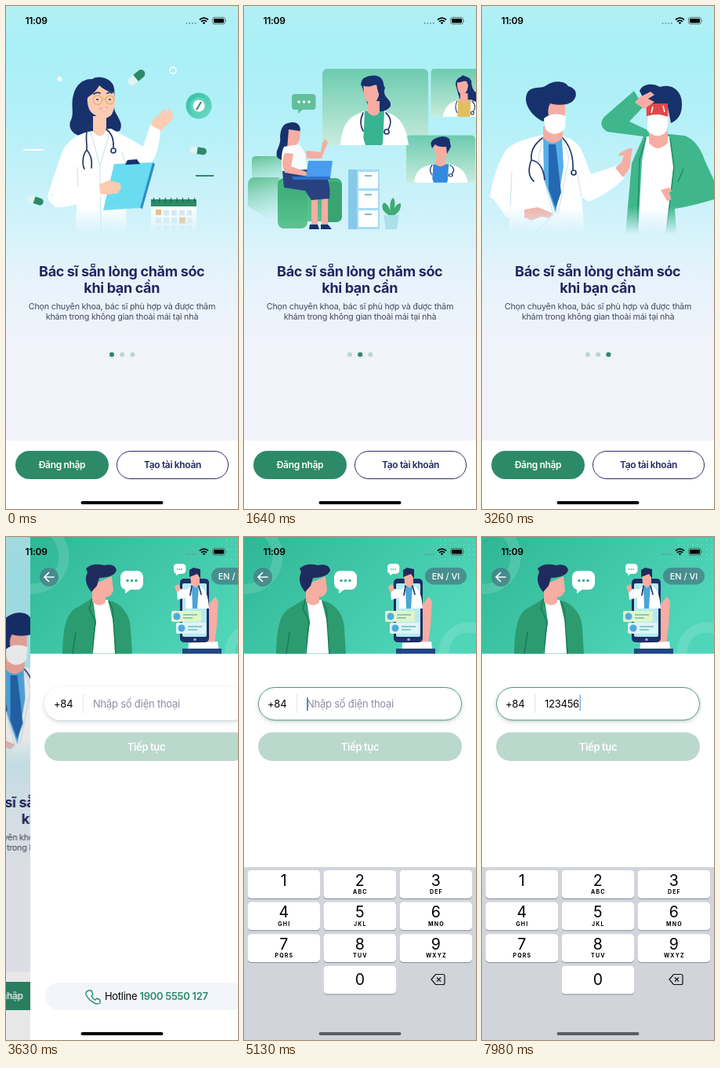
An HTML page that plays this animation: 296 by 640 pixels, repeating every 8000 ms.

```html
<!DOCTYPE html>
<html lang="vi">
<head>
<meta charset="utf-8">
<title>Đăng nhập</title>
<style>
html, body { margin: 0; width: 100%; height: 100%; overflow: hidden; background: #fff; }
svg { display: block; width: 100vw; height: 100vh; font-family: Inter, Roboto, sans-serif; }
svg svg { width: auto; height: auto; }
.mid { text-anchor: middle; }
.title { font-size: 18px; font-weight: 700; letter-spacing: -.36px; fill: #22265f; }
.sub { font-size: 10.8px; letter-spacing: -.24px; fill: #454a5e; }
.btn { font-size: 12px; font-weight: 600; letter-spacing: -.35px; }
.field { font-size: 13px; letter-spacing: -.25px; }
.n { fill: #17316d; } .s { fill: #fbcbb2; } .p { fill: #f6ada3; } .w { fill: #fff; } .g { fill: #2d8a68; } .j { fill: #3fb68b; }
.line { fill: none; stroke: #24386b; stroke-width: 1.7; stroke-linecap: round; }
.fold { fill: none; stroke: #d5e6f1; stroke-width: 1.3; }
.caret { fill: #3f7fe0; font-size: 17px; font-weight: 300; }
</style>
</head>
<body>
<svg viewBox="0 0 296 640" preserveAspectRatio="none">
<defs>
  <linearGradient id="sky" x2="0" y2="1">
    <stop offset="0" stop-color="#b2f0f5"/><stop offset=".08" stop-color="#a9eff6"/>
    <stop offset=".22" stop-color="#b3f0f8"/><stop offset=".4" stop-color="#cdf2fa"/>
    <stop offset=".54" stop-color="#e6f3fb"/><stop offset=".68" stop-color="#f1f3fa"/>
    <stop offset="1" stop-color="#f3f3fa"/>
  </linearGradient>
  <linearGradient id="card" x2="0" y2="1"><stop stop-color="#6ccbb0"/><stop offset="1" stop-color="#c9ecdc"/></linearGradient>
  <linearGradient id="sofa" x2="0" y2="1"><stop stop-color="#3fae78"/><stop offset="1" stop-color="#5cc492"/></linearGradient>
  <linearGradient id="thin" x2=".2" y2="1"><stop stop-color="#5fbf90"/><stop offset="1" stop-color="#9bdcc0" stop-opacity="0"/></linearGradient>
  <linearGradient id="head" x2="1" y2=".5"><stop stop-color="#2fb795"/><stop offset="1" stop-color="#4fd5b8"/></linearGradient>
  <linearGradient id="disc" x2="1" y2="1"><stop stop-color="#2fbfa3"/><stop offset="1" stop-color="#6edcc8"/></linearGradient>
  <linearGradient id="fall" gradientUnits="userSpaceOnUse" x1="0" x2="0" y1="255" y2="290"><stop stop-color="#fff"/><stop offset="1" stop-color="#000"/></linearGradient>
  <mask id="fade" maskUnits="userSpaceOnUse" x="0" y="0" width="296" height="300"><rect width="296" height="300" fill="url(#fall)"/></mask>
  <filter id="soft" x="-10%" y="-30%" width="120%" height="170%"><feDropShadow dx="0" dy="2" stdDeviation="2.5" flood-color="#33475c" flood-opacity=".25"/></filter>
  <clipPath id="headBox"><rect width="296" height="148.500"/></clipPath>
  <g id="copy" class="mid">
    <text class="title" x="147.700" y="343.500">Bác sĩ sẵn lòng chăm sóc</text>
    <text class="title" x="147.700" y="365">khi bạn cần</text>
    <text class="sub" x="148" y="386">Chọn chuyên khoa, bác sĩ phù hợp và được thăm</text>
    <text class="sub" x="148" y="398.500">khám trong không gian thoải mái tại nhà</text>
  </g>
  <g id="pill"><rect x="-11" y="-4.500" width="22" height="9" rx="4.500" fill="#dff3f1"/><path class="g" d="M-1-4.500h7.500a4.500 4.500 0 0 1 0 9H-1z"/></g>
  <g id="bubble"><rect width="29" height="24" rx="8"/><path d="M6 22v7l8-6z"/></g>
  <g id="doctor">
    <path class="w" d="M-43 56C-41 27 -31 19 -12 13L12 13C32 18 40 29 44 56z"/>
    <path d="M-12 13L13 13 11 56-14 56z"/>
    <path class="p" d="M-8 0H7V14Q0 23-8 14z"/>
    <path class="w" d="M-13 12L-20 28-11 56-20 56-26 20zM13 12L18 28 10 56 22 56 26 20z"/>
    <path class="line" d="M-14 15Q-20 27-14 38M15 15Q25 24 18 36"/><circle class="line" cx="16" cy="39" r="3"/>
  </g>
</defs>

<g id="home">
  <rect width="296" height="640" fill="url(#sky)"/>
  <g id="pager">
    <!-- slide 1 -->
    <g>
      <path d="M22 183h26" stroke="#fff" stroke-width="2"/><path d="M242 216h23" stroke="#2d8a68" stroke-width="2"/>
      <circle class="w" cx="68.500" cy="93" r="3"/><circle cx="213" cy="82" r="4" fill="none" stroke="#fff" stroke-width="1.500"/>
      <use href="#pill" transform="translate(166.500 91) rotate(-40) scale(1.150)"/>
      <use href="#pill" transform="translate(245 184) rotate(8)"/>
      <use href="#pill" transform="translate(37 247) rotate(18)"/>
      <circle cx="246" cy="127" r="16.500" fill="url(#disc)"/><circle cx="246" cy="127" r="11" fill="#5fd3bc"/>
      <circle class="w" cx="246" cy="127" r="7.500"/><path d="M243 132l6-10" stroke="#2d8a68" stroke-width="2"/>
      <g mask="url(#fade)">
        <path class="n" d="M110 93C118 88 132 91 137 101C141 113 136 124 139 134C144 144 150 150 145 159L130 162 99 166C88 165 79 158 82 147C88 137 82 127 86 113C89 100 99 92 110 93z"/>
        <path class="s" d="M186 157C184 147 189 140 196 138L202 130 204 135 210 129 210 135 214 138 211 146 200 156 195 163z"/>
        <path class="w" d="M104 160L134 156 158 169 175 179 184 151 197 158C196 179 189 203 177 206L152 197 154 288H88L92 231 64 255Q51 249 54 238L70 190Q77 168 104 160z"/>
        <path class="fold" d="M92 231L91 205M151 197l-3-12M108 160L120 203 121 288M133 158L120 203M57 240Q75 248 120 232"/>
        <path class="s" d="M111 140h17v17q-6 15-17 3zM104 112Q109 99 124 101L138 109Q141 127 135 138Q127 147 114 139Q102 134 104 112z"/>
        <path class="n" d="M102 124Q103 115 109 113Q116 107 119 101Q126 108 138 111L133 96 113 92 99 103z"/>
        <g fill="none" stroke="#e0b458" stroke-width="1.200"><circle cx="117" cy="119.500" r="5.800"/><circle cx="132.500" cy="119.500" r="5.300"/><path d="M123 118h4"/></g>
        <path d="M115 119h3M131 119h3" stroke="#24386b" stroke-width="1.700"/><path d="M112 112q4-3 8-1M129 111q4-2 6 0" class="line" stroke-width="1"/>
        <path class="w" d="M119 130q7 2 11-2q-3 9-11 2z" stroke="#d77b72" stroke-width=".6"/>
        <path class="line" d="M108 152C99 158 104 176 103 183C96 192 98 204 100 207M103 183Q111 192 109 206M128 157Q138 164 137 180"/><circle class="line" cx="137" cy="184" r="3"/>
        <path class="w" d="M60 239Q90 228 119 225L122 240Q88 257 62 256z"/>
        <path d="M138 201L187 199 171 257 124 260z" fill="#69dcf1"/><path d="M187 199l3 2-16 57-3-1z" fill="#2c8fc6"/>
        <path class="n" d="M152 202l3-6 12-1 4 6z"/>
        <path class="s" d="M119 227L131 222 145 225 147 231 143 238 129 240 120 239z"/>
        <rect class="w" x="185" y="247" width="58" height="43"/><path class="g" d="M185 246h58v9h-58z"/>
        <path d="M188 247h55" stroke="#175a46" stroke-width="6" stroke-dasharray="1 6.400"/>
        <path d="M191 263h46M191 273h46M191 283h46" stroke="#dce5ee" stroke-width="7" stroke-dasharray="7 3"/>
        <path d="M191 259h7v7h-7zM221 269h8v8h-8z" fill="#efb06c"/>
      </g>
      <use href="#copy"/>
    </g>
    <!-- slide 2 -->
    <g transform="translate(296)">
      <g fill="url(#card)"><rect x="100" y="80" width="135" height="97" rx="6"/><path d="M296 80H243q-4.500 0-4.500 5v51q0 5 4.500 5h53z"/><rect x="207" y="164.500" width="88" height="60.500" rx="5"/></g>
      <path class="n" d="M150 101C147 91 161 87 170 89C180 92 178 103 179 110C180 118 188 119 187 127C183 135 169 137 160 131L156 120z"/>
      <use href="#doctor" transform="translate(166 121)" fill="#38b493"/>
      <path class="p" d="M152 99L173 101Q174 117 166 124Q155 126 153 112z"/><path class="n" d="M149 101Q163 105 169 98Q170 112 176 117L180 104 170 89 152 92z"/>
      <svg x="239" y="80" width="57" height="61">
        <path class="n" d="M31 20C31 8 46 7 51 15Q51 26 57 30V43Q46 46 36 38z"/>
        <use href="#doctor" transform="translate(42 31) scale(.65)" fill="#e0c05e"/>
        <path class="p" d="M33 15l14 1q1 14-7 17q-8-2-7-18z"/><path class="n" d="M31 17q9 1 13-4l6 16-1-17-9-4z"/>
      </svg>
      <use href="#doctor" transform="translate(251 194) scale(.79 .55)" fill="#3389dd"/>
      <path class="p" d="M242 176h17q2 17-7 21q-9-2-10-21z"/><path class="n" d="M240 181Q236 172 243 169Q255 163 262 169L264 179 259 188 258 179Q248 180 244 176z"/>
      <rect x="61" y="112" width="30.500" height="20" rx="4" fill="#62bf9c"/><path d="M69 131v6l7-6z" fill="#62bf9c"/>
      <g class="w"><circle cx="70" cy="122" r="1.700"/><circle cx="76.500" cy="122" r="1.700"/><circle cx="83" cy="122" r="1.700"/></g>
      <path d="M10 196q0-5 6-5h30q6 0 6 6v36H10z" fill="url(#thin)"/><path d="M5 226q1-8 9-8h31v62L5 255z" fill="url(#thin)"/>
      <rect x="43" y="219" width="82" height="55" rx="8" fill="url(#sofa)"/><rect x="43" y="232" width="38" height="51" rx="8" fill="url(#sofa)"/><rect x="101" y="224" width="24" height="51" rx="7" fill="#3aa470"/>
      <path class="n" d="M56 149C68 145 74 153 71 161L59 186Q52 202 43 193C38 185 48 178 46 166Q47 151 56 149z"/>
      <path class="p" d="M57 157l14 2q2 13-5 18l1 8-12-3zM79 184L98 186 100 174 104 169 107 174 103 183 99 194 80 194zM86 239h8v39h-8zM99 237h8v41h-8z"/>
      <path d="M51 179L70 176Q80 184 80 207L49 212Q46 189 51 179z" fill="#f5fbff"/>
      <path d="M49 210L82 208 106 219Q111 230 109 245L86 247 78 235 51 231z" fill="#27427f"/>
      <path class="p" d="M52 187q-6 14 0 25l30 5v-5l-22-8 3-16z"/>
      <path d="M82 197h31l-3 22H79z" fill="#4a9cf0"/><path d="M61 217h49l-1 4H63z" fill="#2c71cc"/>
      <path class="n" d="M84 278h10l2 6H83zM98 278h9l5 6H98z"/>
      <rect x="133" y="208" width="40" height="76" fill="#a5dcf3"/><path d="M133 208h11v76h-11z" fill="#86c9ea"/>
      <path class="w" d="M146 211h25v21h-25zM146 235h25v22h-25zM146 260h25v21h-25z"/><path d="M154 216h9M154 240h9M154 265h9" stroke="#75bee2" stroke-width="2"/>
      <path d="M187 267C176 263 174 253 179 250Q186 254 187 263C185 250 188 245 191 244Q195 254 189 264Q193 251 200 251Q201 263 188 268z" fill="#3eaa75"/><path d="M178 266h20l-3 18h-14z" fill="#a9e0ea"/>
      <use href="#copy"/>
    </g>
    <!-- slide 3 -->
    <g transform="translate(592)">
      <g mask="url(#fade)">
        <path class="w" d="M78 164L103 165Q124 172 129 188L139 214 172 203 182 219Q160 240 136 249L127 243 131 290H34L36 259 10 243Q15 209 30 184Q39 172 78 164z"/>
        <path d="M78 166L102 167 104 205 94 264 79 220z" fill="#55aee8"/><path d="M85 176h9l7 61-7 20-9-24z" fill="#2468b2"/>
        <path class="fold" d="M78 166L72 194 91 266 67 290M103 168L111 193 97 265M38 211L36 259M127 243L122 214"/>
        <path class="p" d="M78 153h25v14q-11 14-25 1zM75 121h31v30q-8 13-22 6z"/>
        <path class="n" d="M78 147C60 138 52 121 58 110C64 101 76 106 82 101C91 94 106 95 110 102C124 105 123 121 108 125Q95 127 87 124Q83 131 85 140z"/>
        <path class="w" d="M79 143Q91 134 107 140L106 156Q93 169 81 157z"/>
        <path class="line" d="M77 168Q61 180 63 196Q56 214 66 223M63 196Q78 199 80 221M103 168Q117 183 116 208"/><circle class="line" cx="117" cy="212" r="3"/>
        <path d="M12 242L36 254 58 257 55 271 32 270z" class="w"/><path class="p" d="M54 259L71 256 91 264 85 270 76 268 63 273 54 269z"/>
        <path class="j" d="M206 166L160 160Q147 152 156 141L194 108 206 128 188 147 218 161 259 165Q276 172 284 196L296 222V246Q270 254 246 258L248 290H183L191 200z"/>
        <path class="w" d="M210 166L239 166 244 205 235 290H199L204 197z"/>
        <path d="M209 168L201 195 198 288M240 168L245 205 235 288M250 224L257 207" fill="none" stroke="#248761" stroke-width="1.300"/>
        <path class="p" d="M213 154h24v20q-13 14-24 0zM208 122h30v27h-27z"/>
        <path class="n" d="M201 108C205 98 219 98 227 103C244 98 256 110 255 126Q255 143 241 149L237 128 209 124z"/>
        <path d="M210 124h27v16q-15 4-27 0z" fill="#e0484a"/><path d="M218 128l-2 8M231 127l2 8" stroke="#fff" stroke-width="1.500"/>
        <path class="w" d="M211 140Q226 135 238 142L236 159Q224 171 211 159z"/>
        <path class="p" d="M195 123L201 116 215 109 220 113 212 118 220 122 207 131zM170 206L178 199 181 190 174 191Q173 187 188 181Q194 180 191 186L188 207 180 218zM228 234L239 231 249 244 236 248z"/>
        <path class="j" d="M239 237L270 224 296 224V246L244 255z"/>
      </g>
      <use href="#copy"/>
    </g>
  </g>
  <g fill="#b8d6d2"><circle cx="135" cy="443.500" r="3"/><circle cx="148.200" cy="443.500" r="3"/><circle cx="161.400" cy="443.500" r="3"/></g>
  <circle id="dot" class="g" cx="135" cy="443.500" r="3"/>
  <rect class="w" y="553" width="296" height="87"/>
  <rect class="g" x="12" y="566" width="119" height="36" rx="18"/>
  <rect class="w" x="141.500" y="566.500" width="142" height="35" rx="17.500" stroke="#2a2d6b"/>
  <text class="btn mid w" x="71.300" y="588">Đăng nhập</text>
  <text class="btn mid" x="212.500" y="588" fill="#22265f">Tạo tài khoản</text>
</g>
<rect id="shade" width="296" height="640"/>

<g id="login">
  <rect class="w" width="296" height="640"/>
  <g clip-path="url(#headBox)">
    <rect width="296" height="149" fill="url(#head)"/>
    <g fill="none" stroke="#fff" stroke-opacity=".13" stroke-width="13"><circle cx="2" cy="25" r="41"/><circle cx="287" cy="147" r="32"/></g>
    <path d="M250 4h46M250 10h46M250 16h46M250 22h46M250 28h46" stroke="#fff" stroke-opacity=".22" stroke-width="1.500" stroke-dasharray="1.500 4.500"/>
    <path d="M41 149C42 116 45 96 61 89L79 78 105 82Q126 91 128 116L130 149z" fill="#2c9b70"/>
    <path class="w" d="M80 79L99 80 107 113 108 149H78L84 109z"/><path d="M79 78L75 91 83 107 79 149M100 81L105 92 109 149M54 149l4-28" fill="none" stroke="#1b7a58" stroke-width="1.500"/>
    <path class="p" d="M79 61L104 50 106 68Q102 78 96 76V83Q88 91 79 82z"/>
    <path d="M78 70Q67 57 73 45L71 40Q80 32 94 36Q108 33 110 42Q108 51 88 52L85 62z" fill="#202b5d"/>
    <use href="#bubble" class="w" x="115" y="43"/><use href="#bubble" class="w" transform="translate(183 34) scale(.53)"/>
    <g fill="#35ad91"><circle cx="124" cy="55.500" r="1.700"/><circle cx="129.500" cy="55.500" r="1.700"/><circle cx="135" cy="55.500" r="1.700"/></g>
    <path d="M187 41h7" stroke="#35ad91" stroke-width="1.500" stroke-dasharray="1.500 1.200"/>
    <path class="p" d="M222 93L236 76 240 82 238 113 235 137H203L207 127z"/><path class="w" d="M202 135l37-2 2 16h-40z"/><path d="M194 142h50v7h-50z" fill="#234583"/>
    <rect x="191" y="53" width="37" height="81" rx="5" fill="#1d2f68"/><rect x="194" y="59" width="31" height="68" rx="2" fill="#b5ebef"/><circle cx="210" cy="130.500" r="1.800" fill="#8fa7d5"/>
    <path class="w" d="M187 70L191 66 200 67 207 61 216 62Q227 67 228 91H198V77L188 80z"/><path d="M206 62h9l-2 29h-6z" fill="#48a6d9"/>
    <path class="p" d="M204 47h12v13l-5 5-6-6zM184 63l5-3 3 7-5 4z"/><path d="M203 51v-9l5-3 9 2v12l-4-6z" fill="#202b5d"/>
    <path class="line" d="M206 62l-2 12m11-12l3 11" stroke-width="1"/>
    <rect x="180" y="94" width="38" height="14" rx="2" fill="#dff5cb"/><rect x="186" y="109" width="38" height="14" rx="2" fill="#def4fb"/>
    <circle cx="187" cy="101" r="4.500" fill="#51a9df"/><circle cx="193" cy="116" r="4.500" fill="#51a9df"/>
    <path d="M195 99h18M195 103h12M201 114h18M201 118h12" stroke="#6fbfaa" stroke-width="1.700"/>
  </g>
  <circle cx="24" cy="51" r="12" fill="#477a85" fill-opacity=".75"/><path d="M30.500 51h-12m5.500-6l-6 6 6 6" fill="none" stroke="#fff" stroke-width="1.700"/>
  <rect x="231" y="39" width="53" height="21.500" rx="10.700" fill="#477a85" fill-opacity=".75"/>
  <text class="mid w" x="257.500" y="53.500" font-size="11" font-weight="500">EN / VI</text>
  <rect class="w" x="18" y="191" width="260" height="42" rx="21" filter="url(#soft)"/>
  <rect id="focus" x="18.500" y="191.500" width="259" height="41.500" rx="20.700" fill="none" stroke="#4f957e"/>
  <path d="M67.500 200v24" stroke="#e3e5e9"/>
  <text class="field" x="30" y="217">+84</text>
  <g id="entries" class="field">
    <text id="entry0" x="80" y="217" fill="#8b8fa0">Nhập số điện thoại</text>
  </g>
  <rect id="caret" x="80" y="204" width="1.600" height="17" fill="#3f7fe0"/>
  <rect x="18" y="248.500" width="260" height="36.500" rx="18.200" fill="#bbd8cd"/>
  <text class="mid w" x="148" y="271.500" font-size="13" font-weight="600" letter-spacing="-.35">Tiếp tục</text>
  <rect x="19" y="567" width="258" height="35" rx="17.500" fill="#f2f6fb"/>
  <path d="M75 577l3 0 2 5-2 2q2 4 5 5l2-2 4 2v4q-3 2-7 0q-8-4-11-11q-1-4 4-5z" fill="none" stroke="#2d8a68" stroke-width="1.400" stroke-linejoin="round"/>
  <text x="95" y="589" font-size="13" letter-spacing="-.3">Hotline <tspan class="g" font-weight="600">1900 5550 127</tspan></text>
</g>

<g id="pad">
  <rect y="420" width="296" height="220" fill="#d1d4da"/>
  <g id="keys"></g>
  <path d="M239 563l5.500-6.500H254q2 0 2 2v9q0 2-2 2h-9.500zM246 560.500l5 5m0-5l-5 5" fill="none" stroke="#111" stroke-width="1.200"/>
</g>

<text x="24.500" y="23" font-size="12" font-weight="600" letter-spacing="-.3">11:09</text>
<g fill="#6f8b92"><circle cx="230.500" cy="22" r=".9"/><circle cx="234.300" cy="22" r=".9"/><circle cx="238" cy="22" r=".9"/><circle cx="241.700" cy="22" r=".9"/></g>
<path d="M247 17.500q5.500-4.800 11 0M249 19.800q3.500-3 7 0" fill="none" stroke="#000" stroke-width="1.700"/><path d="M250.700 21.300q1.800-1.400 3.600 0l-1.800 2z"/>
<rect x="263.500" y="14.500" width="16" height="8.500" rx="2.500" fill="none" stroke="#555" stroke-width=".8"/><rect x="265" y="16" width="13" height="5.500" rx="1.300"/><path d="M280.700 17.300q1.500 1.500 0 3z" fill="#555"/>
<rect id="bar" x="95.500" y="630" width="105" height="4" rx="2"/>
</svg>
<script>
const LOOP = 8000;
const svgNS = 'http://www.w3.org/2000/svg';
const sheet = document.head.appendChild(document.createElement('style'));

// Holds each value from its time in ms until the next one.
function track(id, prop, steps) {
  const frames = [...steps, [LOOP, steps.at(-1)[1]]];
  const body = frames.map(([ms, v]) => `${ms / LOOP * 100}%{${prop}:${v}}`).join('');
  sheet.append(`@keyframes ${id}{${body}}#${id}{animation:${id} ${LOOP}ms step-end infinite}`);
}
const move = (id, axis, steps) =>
  track(id, 'transform', steps.map(([ms, v]) => [ms, `translate${axis}(${v}px)`]));
const show = (id, from, to) =>
  track(id, 'opacity', [[0, from ? 0 : 1], ...(from ? [[from, 1]] : []), ...(to ? [[to, 0]] : [])]);

function add(parent, tag, attrs, text = '') {
  const el = document.createElementNS(svgNS, tag);
  for (const name in attrs) el.setAttribute(name, attrs[name]);
  el.textContent = text;
  return parent.appendChild(el);
}

// Swiping the pages
move('pager', 'X', [[0, 0], [500, -22], [600, -142], [710, -272], [810, -294], [1640, -296],
  [1760, -320], [1860, -440], [1970, -568], [2070, -590], [3260, -592]]);
move('dot', 'X', [[0, 0], [710, 13.2], [1970, 26.4]]);

// Pushing the login screen
const push = [3420, 3520, 3630, 3730, 3840, 3940].map(ms =>
  [ms, ms < 3940 ? Math.round(296 * Math.exp(-9.8 * (ms - 3400) / 1000)) : 0]);
move('login', 'X', [[0, 296], ...push]);
move('home', 'X', [[0, 0], ...push.map(([ms, x]) => [ms, -.3 * (296 - x)])]);
track('shade', 'opacity', [[0, 0], ...push.map(([ms, x]) => [ms, .1 * (1 - x / 296)])]);

// Focus and keyboard
show('focus', 4580);
show('caret', 4580, 5630);
move('pad', 'Y', [[0, 220], [4680, 150], [4790, 62], [4900, 20], [5000, 5], [5130, 0]]);
track('bar', 'fill', [[0, '#000'], [4790, '#5d5f64']]);

// Keys: press and release times of 1 to 6
const taps = [[5400, 5630], [5780, 6020], [6170, 6500], [6750, 6910], [7090, 7280], [7520, 7980]];
const letters = ['', 'ABC', 'DEF', 'GHI', 'JKL', 'MNO', 'PQRS', 'TUV', 'WXYZ'];
const keys = document.getElementById('keys');
function addKey(digit, col, row) {
  const x = 4.5 + col * 97, y = 424 + row * 40.6, cx = x + 46.3;
  add(keys, 'rect', { x, y: y + 1, width: 92.5, height: 35.7, rx: 4.5, fill: '#898c91' });
  add(keys, 'rect', { id: 'key' + digit, x, y, width: 92.5, height: 35.7, rx: 4.5, fill: '#fff' });
  add(keys, 'text', { class: 'mid', x: cx, y: y + (digit ? 19.5 : 24.5), 'font-size': 19.5 }, digit);
  add(keys, 'text', { class: 'mid', x: cx + .6, y: y + 30, 'font-size': 7, 'font-weight': 700, 'letter-spacing': 1.2 }, letters[digit - 1] || '');
}
for (let d = 1; d < 10; d++) addKey(d, (d - 1) % 3, Math.floor((d - 1) / 3));
addKey(0, 1, 3);

show('entry0', 0, taps[0][1]);
taps.forEach(([down, up], i) => {
  const n = i + 1;
  track('key' + n, 'fill', [[0, '#fff'], [down, '#b0bcc8'], [up, '#fff']]);
  const entry = add(document.getElementById('entries'), 'text', { id: 'entry' + n, x: 80, y: 217 }, '123456'.slice(0, n));
  add(entry, 'tspan', { class: 'caret', dx: -1.5 }, '|');
  show('entry' + n, up, taps[n]?.[1]);
});
</script>
</body>
</html>
```
